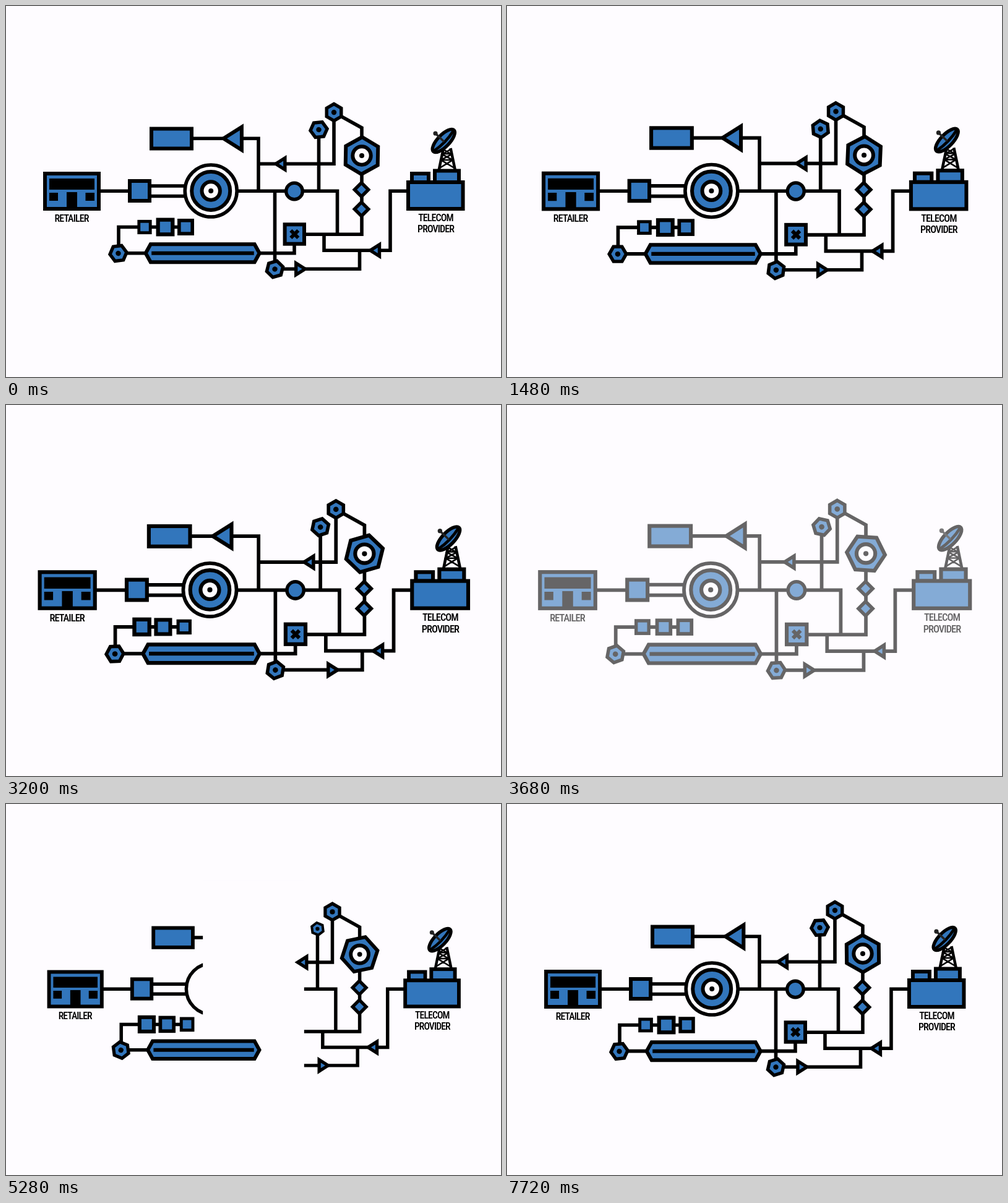
Animation, 800 px wide and 600 px high, one loop 7760 ms. Source, as an HTML page without scripts:

```html
<!DOCTYPE html>
<html lang="en">
<head>
<meta charset="utf-8">
<title>Retailer to telecom provider</title>
<style>
/* --u: milliseconds since the scene began to fade in */
@property --u { syntax: "<number>"; inherits: true; initial-value: 0; }
@keyframes clock { from { --u: 0 } to { --u: 7760 } }

html, body { margin: 0; width: 100%; height: 100%; overflow: hidden; background: #fefcff; }
svg { display: block; width: 800px; height: 600px; animation: clock 7760ms linear -3800ms infinite; }

.scene {
  fill: #3276bc; stroke: #000; stroke-width: 6;
  transform-origin: 400px 300px;
  transform: scale(calc(.9703 + var(--u) * .00000782));
  opacity: clamp(0, min(var(--u) / 400, (7720 - var(--u)) / 400), 1);
}
.wires { fill: none; stroke-width: 5.6; }
.cover {
  fill: #fefcff; stroke: none;
  transform-origin: 400px 300px;
  transform: scaleX(clamp(0, 1 - (var(--u) - 400) / 1388, 1));
}
.pop { transform: scale(clamp(0, (var(--u) - var(--d)) / 200, 1)); }
.spin { transform: rotate(calc((var(--u) - 3800) * var(--w) * 1deg + var(--a) * 1deg)); }
.slide { transform: translateX(calc(var(--r) * 1px * cos((var(--u) - 3800) * .18557deg + var(--a) * 1deg))); }
.pulse { transform: scale(calc(var(--m) + var(--r) * cos((var(--u) - 3800 - var(--p)) * var(--w) * 1deg))); }
.thin { stroke-width: 5.4; }
.ink { fill: #000; stroke: none; }
.paper { fill: #fefcff; }
.open { fill: none; }
text {
  font: 500 16px "Roboto Condensed", Roboto, "Open Sans", sans-serif;
  font-stretch: 82%; letter-spacing: -.9px;
  text-anchor: middle; fill: #000; stroke: none;
}
</style>
</head>
<body>
<svg viewBox="0 0 800 600">
  <defs>
    <g id="nut" class="thin">
      <path d="M0-13.6L11.8-6.8V6.8L0 13.6L-11.8 6.8V-6.8Z"/>
      <circle r="4.2" class="ink"/>
    </g>
    <g id="eye">
      <circle r="14.7" class="paper"/>
      <circle r="4" class="ink"/>
    </g>
    <path id="arrow" class="thin" d="M-6.3 0L8.5-9.4V9.4Z"/>
    <path id="gem" class="thin" d="M0-11.2L11.2 0L0 11.2L-11.2 0Z"/>
    <rect id="box" class="thin" x="-10.3" y="-10.3" width="20.6" height="20.6"/>
  </defs>

  <g class="scene">
    <g class="wires">
      <path d="M150 299.3H200M232 291H291M232 307.5H291M372 299.3H535.5V369.3"/>
      <path d="M300 214.3H408V299M408 255.2H530V172L575 197V369.3H482"/>
      <path d="M505.5 200V299M434.5 299V425.3H571.5V395"/>
      <path d="M514 369V395.3H621V299.3H650"/>
      <path d="M410 399.7H466V384M228 399.7H182V357.5H292"/>
      <circle cx="331.2" cy="299" r="42"/>
    </g>
    <rect class="cover" x="152" y="120" width="496" height="350"/>

    <!-- left half -->
    <g transform="translate(216 299)"><rect class="pop" style="--d:700" x="-16" y="-16" width="32" height="32"/></g>
    <g transform="translate(267.5 214.5)"><rect class="pop" style="--d:980" x="-32.5" y="-16" width="65" height="32"/></g>
    <g transform="translate(349 214.3)">
      <g class="slide" style="--r:20;--a:37"><path class="pop" style="--d:1400" d="M-13.4 0L16-18.6V18.6Z"/></g>
    </g>
    <g transform="translate(331.2 299)">
      <g class="pop" style="--d:1400"><circle r="31"/><use href="#eye"/></g>
    </g>
    <g transform="translate(224 357.5)">
      <g class="pop" style="--d:780"><use href="#box" class="pulse" style="--m:1.02;--r:.13;--w:.5103;--p:378"/></g>
    </g>
    <g transform="translate(257.5 357.5)">
      <g class="pop" style="--d:960"><use href="#box" class="pulse" style="--m:1.01;--r:.14;--w:.4639;--p:-20"/></g>
    </g>
    <g transform="translate(290.5 357.5)">
      <g class="pop" style="--d:1120"><use href="#box" class="pulse" style="--m:.98;--r:.07;--w:.5103;--p:70"/></g>
    </g>
    <g transform="translate(181.5 400)">
      <g class="pop" style="--d:560"><use href="#nut" class="spin" style="--w:-.036;--a:23"/></g>
    </g>
    <g transform="translate(317.7 399.7)">
      <g class="pop" style="--d:1080">
        <path d="M-92 0L-84-14.5H84L92 0L84 14.5H-84Z"/>
        <path d="M-82.5 0H83"/>
      </g>
    </g>

    <!-- right half -->
    <g transform="translate(595 395.3)"><use href="#arrow" class="pop" style="--d:680"/></g>
    <g transform="translate(575 242)">
      <g class="pop" style="--d:800">
        <path class="spin" style="--w:.0415;--a:1" d="M0-30L26-15V15L0 30L-26 15V-15Z"/>
        <use href="#eye"/>
      </g>
    </g>
    <g transform="translate(574.5 297)"><use href="#gem" class="pop" style="--d:800"/></g>
    <g transform="translate(574.5 328.5)"><use href="#gem" class="pop" style="--d:800"/></g>
    <g transform="translate(530 172)"><use href="#nut" class="pop" style="--d:1040"/></g>
    <g transform="translate(505.5 200)">
      <g class="pop" style="--d:1170"><use href="#nut" class="spin" style="--w:-.06;--a:24"/></g>
    </g>
    <g transform="translate(464 255.2)">
      <g class="slide" style="--r:24.5;--a:152"><use href="#arrow" class="pop" style="--d:1100"/></g>
    </g>
    <g transform="translate(504 425.3)">
      <g class="slide" style="--r:28;--a:163">
        <g class="pop" style="--d:1100"><use href="#arrow" transform="scale(-1 1)"/></g>
      </g>
    </g>
    <g transform="translate(466 299.5)"><circle class="pop thin" style="--d:1410" r="13.3"/></g>
    <g transform="translate(466.3 369)">
      <g class="pop" style="--d:1410">
        <rect x="-15.7" y="-15.7" width="31.4" height="31.4"/>
        <path d="M-6-6L6 6M6-6L-6 6"/>
      </g>
    </g>
    <g transform="translate(434.5 425.5)">
      <g class="pop" style="--d:1590"><use href="#nut" class="spin" style="--w:.036;--a:14"/></g>
    </g>

    <!-- shop -->
    <rect x="63" y="271" width="87" height="57"/>
    <path class="ink" d="M70 279H143V297H70ZM70 302H84V315H70ZM128.5 302H143V315H128.5ZM98 301H115V330H98Z"/>
    <text x="106" y="348.7">RETAILER</text>

    <!-- station -->
    <rect x="656" y="271" width="27" height="14"/>
    <rect x="693" y="266.5" width="39" height="18.5"/>
    <rect x="650" y="285" width="88.5" height="43"/>
    <path class="open" stroke-width="4.5" d="M699.5 266L707 230M726 266L718.5 230"/>
    <path class="open" stroke-width="2.6" d="M701 262L722 249L705 240L718 232M724.5 262L703 249L720 240L707 232M703 249H722M705 239H720"/>
    <g transform="translate(707.3 218) rotate(-46)">
      <ellipse rx="24" ry="9.6" stroke-width="5.4"/>
      <path class="open" stroke-width="4.6" d="M-23 0Q0 5 23 0"/>
    </g>
    <path d="M694 206L708 219.5" stroke="#222" stroke-width="3.4"/>
    <circle cx="694" cy="206" r="3.6" fill="#222" stroke="none"/>
    <text x="694.5" y="348">TELECOM</text>
    <text x="694.5" y="366">PROVIDER</text>
  </g>
</svg>
</body>
</html>
```
